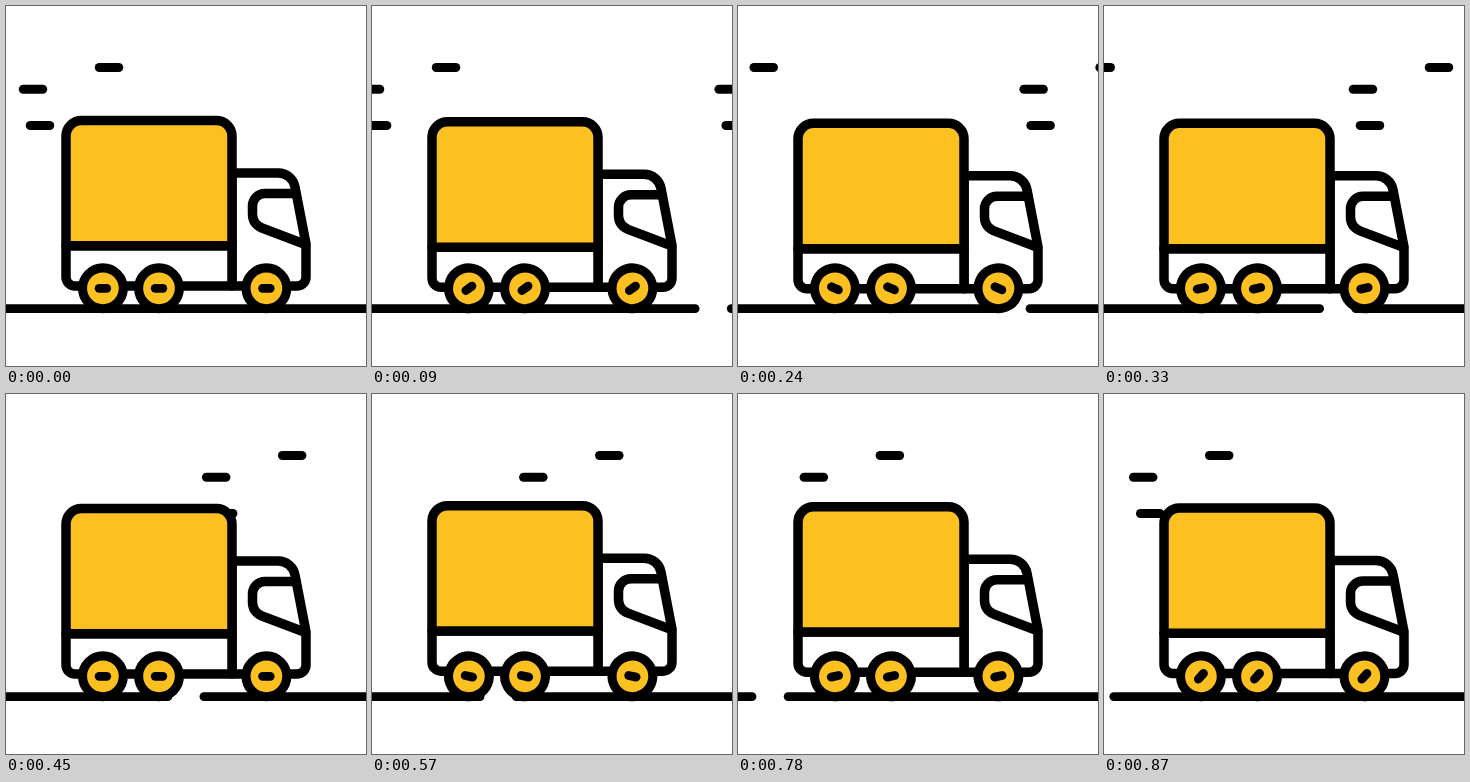
Animation, 360 px wide and 360 px high, one loop 0.9 s. Source, as an HTML page with a canvas:

```html
<!DOCTYPE html>
<html lang="en">
<head>
<meta charset="utf-8">
<title>Delivery truck</title>
<style>
  html, body { margin: 0; width: 100%; height: 100%; overflow: hidden; background: #fff; }
  canvas { display: block; width: 360px; height: 360px; }
</style>
</head>
<body>
<canvas></canvas>
<script>
const LOOP = 900, STEP = 30, SIZE = 360;
const YELLOW = '#fdc021', INK = '#000';

const canvas = document.querySelector('canvas');
const ctx = canvas.getContext('2d');
const ratio = window.devicePixelRatio || 1;
canvas.width = canvas.height = SIZE * ratio;
ctx.scale(ratio, ratio);
ctx.lineCap = ctx.lineJoin = 'round';
ctx.strokeStyle = INK;

// Resting centre of each wind dash
const winds = [{ x: 103, y: 61.5 }, { x: 27, y: 83.2 }, { x: 34, y: 119.5 }];
const wheels = [96.9, 153, 260.4];

const cab = new Path2D('M226 167H272A17 17 0 0 1 289 181L300 238V271A9 9 0 0 1 291 280H226Z');
const cabWindow = new Path2D('M290 187.5H259A12.5 12.5 0 0 0 246.5 200V208Q246.5 218 256 222L299.5 238.5');
const chassis = new Path2D('M60 239.8V271A9 9 0 0 0 69 280H226V239.8Z');
const box = new Path2D('M60 239.8V130A15.5 15.5 0 0 1 75.5 114.5H210.5A15.5 15.5 0 0 1 226 130V239.8Z');

function line(x1, x2, y, width) {
  ctx.lineWidth = width;
  ctx.beginPath();
  ctx.moveTo(x1, y);
  ctx.lineTo(x2, y);
  ctx.stroke();
}

function shape(path, fill) {
  ctx.lineWidth = 9.5;
  if (fill) {
    ctx.fillStyle = fill;
    ctx.fill(path);
  }
  ctx.stroke(path);
}

// Each dash drifts out on the left while its successor enters faster on the right
function drawWind(t) {
  for (const { x, y } of winds) {
    const leaving = x - 0.322 * t;
    const entering = x + 0.407 * (LOOP - t);
    for (const cx of [leaving, entering]) line(cx - 9.7, cx + 9.7, y, 9.1);
  }
}

function drawRoad(t) {
  const gap = 367.5 - 0.448 * t;
  line(-20, gap - 4, 302.6, 8.7);
  line(gap + 32, SIZE + 60, 302.6, 8.7);
}

// Sinks to its lowest at 300 ms, springs up by 600 ms, then settles slowly
function bounce(t) {
  if (t >= 300 && t < 600) return 3 * Math.cos(Math.PI * (t - 300) / 300);
  const settle = (t + 300) % LOOP / 600;
  return -3 * Math.cos(Math.PI * settle);
}

function drawBody(t) {
  ctx.save();
  ctx.translate(0, bounce(t));
  shape(cab, '#fff');
  shape(cabWindow);
  shape(chassis, '#fff');
  shape(box, YELLOW);
  ctx.restore();
}

function drawWheel(x, angle) {
  ctx.save();
  ctx.translate(x, 282.3);
  ctx.rotate(angle);
  ctx.beginPath();
  ctx.arc(0, 0, 20.4, 0, 2 * Math.PI);
  ctx.fillStyle = YELLOW;
  ctx.fill();
  ctx.lineWidth = 9.1;
  ctx.stroke();
  line(-3.8, 3.8, 0, 8.8);
  ctx.restore();
}

function draw(now) {
  const t = Math.floor(now % LOOP / STEP) * STEP;
  ctx.fillStyle = '#fff';
  ctx.fillRect(0, 0, SIZE, SIZE);
  drawWind(t);
  drawRoad(t);
  drawBody(t);
  const angle = 8 * Math.PI * t / LOOP;
  for (const x of wheels) drawWheel(x, angle);
}

let start;
function tick(now) {
  start ??= now;
  draw(Math.max(0, now - start));
  requestAnimationFrame(tick);
}
draw(0);
requestAnimationFrame(tick);
</script>
</body>
</html>
```
